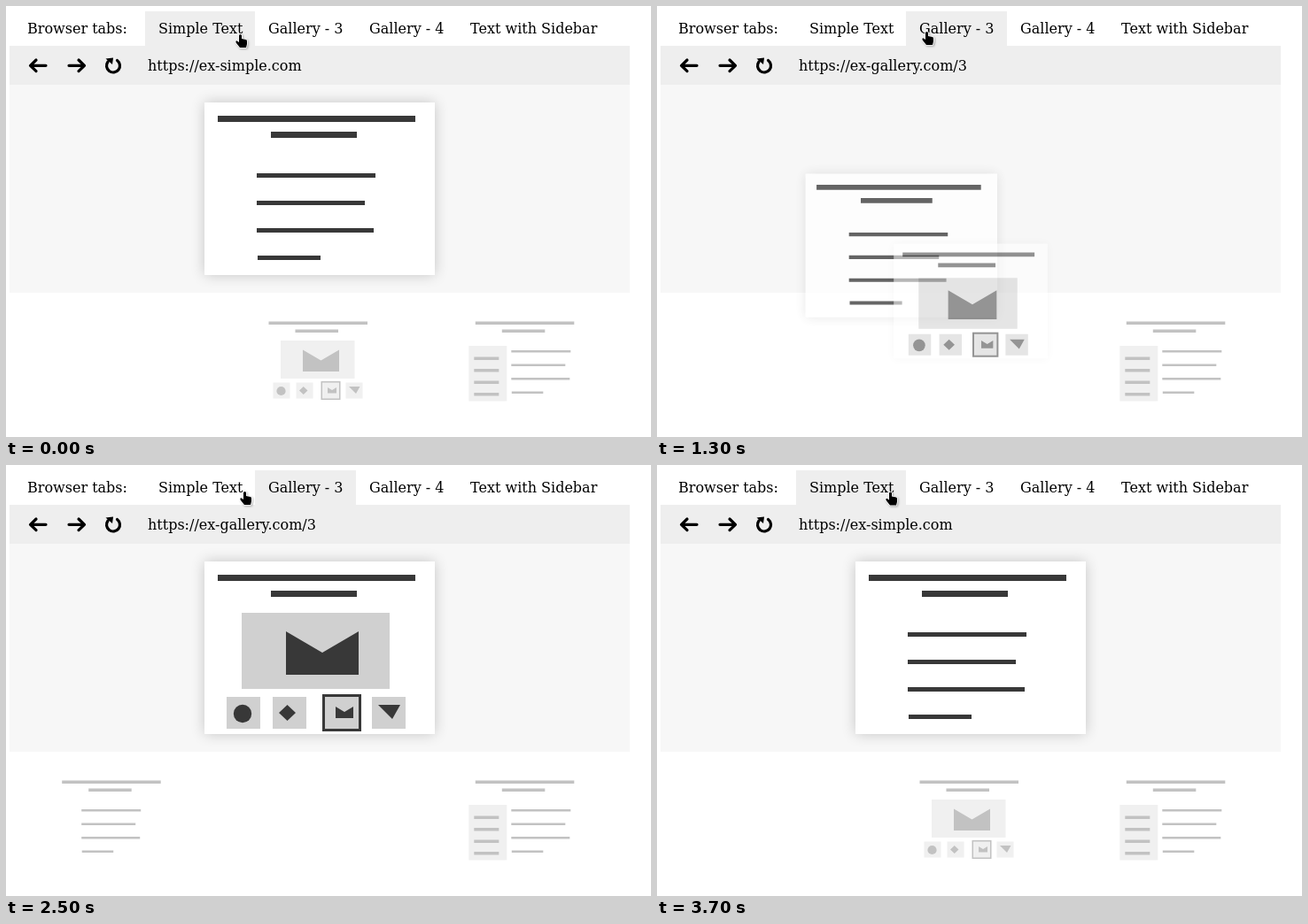
Animation of 728 by 487 pixels, one loop 4000 ms. Source, as an HTML page:

```html
<!DOCTYPE html>
<html lang="en">
<head>
<meta charset="utf-8">
<title>Browser tabs</title>
<style>
  html, body { margin: 0; width: 100%; height: 100%; overflow: hidden; background: #fff; }
  svg { display: block; }
  text { font: 16px "DejaVu Serif", "Noto Serif", serif; }
  .dark { fill: #383838; }
  .tile { fill: #d0d0d0; }
  .icon { fill: none; stroke: #000; stroke-width: 3.2; stroke-linecap: round; stroke-linejoin: round; }
</style>
</head>
<body>
<svg width="728" height="487" viewBox="0 0 728 487">
  <defs>
    <filter id="blur" x="-20%" y="-20%" width="140%" height="140%"><feGaussianBlur stdDeviation="8"/></filter>
    <g id="paper">
      <path class="dark" d="M15 15h223v7h-223zM75 33h97v7h-97z"/>
    </g>
    <path id="lines" class="dark" d="M59 80h134v5h-134zM59 111h122v5h-122zM59 142h132v5h-132zM60 173h71v5h-71z"/>
  </defs>

  <rect id="tab" y="6" height="39" fill="#eee"/>
  <rect x="4" y="45" width="700" height="44" fill="#eee"/>
  <rect x="4" y="89" width="700" height="235" fill="#f7f7f7"/>
  <text x="24" y="31">Browser tabs:</text>
  <text x="172" y="31">Simple Text</text>
  <text x="296" y="31">Gallery - 3</text>
  <text x="410" y="31">Gallery - 4</text>
  <text x="524" y="31">Text with Sidebar</text>
  <text id="url" x="160" y="73"></text>

  <path class="icon" d="M45 67.3H28M34 61l-6.500 6.300 6.500 6.300M71 67.300H88M82 61l6.500 6.300-6.500 6.300"/>
  <path class="icon" stroke-linecap="butt" d="M125.500 61.500A7.500 7.500 0 1 1 115 63"/>
  <path d="M112.500 59.500L121 58.500 120 66z"/>

  <g id="simple" class="card">
    <use href="#paper"/>
    <use href="#lines"/>
  </g>

  <g id="gallery" class="card">
    <use href="#paper"/>
    <path class="tile" d="M42 58h167v86h-167zM25 153h38v36h-38zM77 153h38v36h-38zM135 152h40v38h-40zM189 153h38v36h-38z"/>
    <path class="dark" d="M92 79l41 24 41-24v49h-82zM93.500 162l9.500 9-9.500 9-9.500-9zM148 164l10 6 10-6v13h-20zM196 162h25l-9 16z"/>
    <circle class="dark" cx="43" cy="172" r="10.200"/>
    <rect x="134.500" y="151.500" width="41" height="39" fill="none" stroke="#383838" stroke-width="3"/>
  </g>

  <g id="sidebar" class="card">
    <use href="#paper"/>
    <path class="tile" d="M0 70h86v125h-86z"/>
    <path class="dark" d="M12 95h56v7h-56zM12 122h56v7h-56zM12 149h56v7h-56zM12 176h56v7h-56z"/>
    <use href="#lines" x="37"/>
  </g>

  <g id="cursor">
    <path d="M0 1.500a1.500 1.500 0 0 1 3 0V5L8 6Q9.200 6.300 9 8.500V11L8 15H1L-3 10Q-4.500 7.500-2.500 7.200L0 9z"
      stroke="#fff" stroke-width="1.600" stroke-linejoin="round" paint-order="stroke"
      style="filter: drop-shadow(1px 1px 1px rgba(0,0,0,.3))"/>
  </g>
</svg>
<script>
const $ = id => document.getElementById(id);
const clamp = v => Math.min(1, Math.max(0, v));
const mix = (a, b, k) => a + (b - a) * k;
const smooth = k => k * k * (3 - 2 * k);

// cubic-bezier(.25, .1, .25, 1), solved by bisection
function ease(x) {
  if (x <= 0) return 0;
  if (x >= 1) return 1;
  const curve = (a, b, u) => 3 * a * u * (1 - u) ** 2 + 3 * b * u * u * (1 - u) + u ** 3;
  let lo = 0, hi = 1;
  for (let i = 0; i < 24; i++) {
    const mid = (lo + hi) / 2;
    if (curve(.25, .25, mid) < x) lo = mid; else hi = mid;
  }
  return curve(.1, 1, lo);
}

// time, x, y of the fingertip
const path = [
  [0, 263, 32], [400, 263, 32], [1000, 302, 28.5], [1100, 302, 28.5], [1200, 303, 29],
  [1900, 303, 29], [2000, 302, 28], [2500, 268, 30], [3000, 268, 30], [3100, 262, 30.5], [4000, 262, 30.5]
];

for (const card of document.querySelectorAll(".card")) {
  card.insertAdjacentHTML("afterbegin", "");
  const box = (fill, extra) => {
    const r = document.createElementNS("http://www.w3.org/2000/svg", "rect");
    for (const [k, v] of Object.entries({ width: 260, height: 195, fill, ...extra })) r.setAttribute(k, v);
    return r;
  };
  card.prepend(box("#000", { filter: "url(#blur)" }), box("#fff"));
}

// k: 0 = resting thumbnail, 1 = open page
function place(id, restX, k) {
  const card = $(id), x = mix(restX, 354, k), y = mix(397.75, 206.5, k);
  card.setAttribute("transform", `translate(${x} ${y}) scale(${mix(.5, 1, k)}) translate(-130 -97.5)`);
  card.setAttribute("opacity", mix(.3, 1, k));
  card.firstElementChild.setAttribute("opacity", .2 * k);
}

function draw(now) {
  // motion is stepped: every 100 ms, then every 200 ms near the end
  const ms = now % 4000;
  const t = ms < 3100 ? Math.floor(ms / 100) * 100 : 3100 + Math.floor((ms - 3100) / 200) * 200;

  const open = ease((t - 1213) / 400) - ease((t - 3192) / 400);
  place("simple", 120.7, 1 - open);
  place("gallery", 354, open);
  place("sidebar", 587.3, 0);

  const onGallery = t >= 1200 && t < 3300;
  $("tab").setAttribute("x", onGallery ? 281 : 157);
  $("tab").setAttribute("width", onGallery ? 114 : 124);
  $("url").textContent = onGallery ? "https://ex-gallery.com/3" : "https://ex-simple.com";

  const i = path.findIndex(p => p[0] > t);
  const [a, b] = [path[i - 1], path[i]];
  const k = smooth(clamp((t - a[0]) / (b[0] - a[0])));
  $("cursor").setAttribute("transform", `translate(${mix(a[1], b[1], k)} ${mix(a[2], b[2], k)})`);
}

const start = performance.now();
function tick() {
  draw(performance.now() - start);
  requestAnimationFrame(tick);
}
tick();
</script>
</body>
</html>
```
